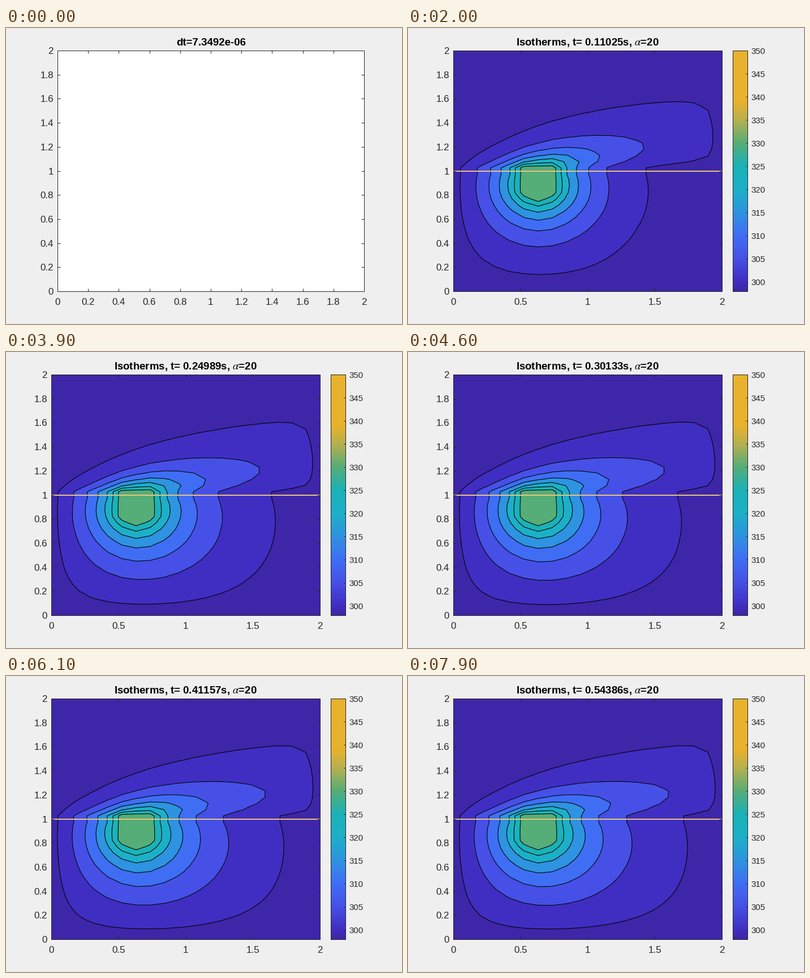
A matplotlib script for the animation above (8000 ms loop, 700 by 525 pixels).

```python
import numpy as np
import matplotlib.pyplot as plt
from matplotlib.animation import FuncAnimation
from matplotlib.colors import LinearSegmentedColormap

plt.rcParams["font.family"] = "Liberation Sans"
plt.rcParams["mathtext.fontset"] = "stix"

W, H, DPI = 700, 525, 100
FRAMES, STEP_MS, BLANK = 80, 100, 5
INK = "#262626"
PX = 72 / DPI

# heat model: block cooled at its surface, stream of speed U above it
NX, NY, HALF = 20, 40, 20
DX, DY = 2 / (NX - 1), 1 / (HALF - 1)
DT = 7.34923e-6
T0, HOT = 298.0, 333.15
DIFF, U = 1.0, 24.0
ALPHA, COND = 20.0, 20.0
SUB = 10


def is_hot(j, i):
    y = min(j, HALF - 1) * DY
    return j <= HALF and np.hypot(i * DX - 0.632, y - 0.9) < 0.15


def build():
    """Matrix that advances the field by 1000 steps, and the starting field."""
    n = NX * NY
    h = 1000 * DT / SUB
    cx, cy = h * DIFF / DX**2, h * DIFF / DY**2
    m, keep, start = np.eye(n), np.ones(n), np.zeros(n)
    for j in range(NY):
        for i in range(NX):
            p = j * NX + i
            if is_hot(j, i):
                start[p] = HOT - T0
            elif i in (0, NX - 1) or j in (0, NY - 1):
                continue
            elif j in (HALF - 1, HALF):
                keep[p] = 0
                m[p, (HALF - 2) * NX + i] = -1 / (1 + ALPHA / COND * DY)
            else:
                cu = h * U / DX if j > HALF else 0
                m[p, p] += 2 * cx + 2 * cy + cu
                m[p, p - 1] -= cx + cu
                m[p, p + 1] -= cx
                m[p, p - NX] -= cy
                m[p, p + NX] -= cy
    return np.linalg.matrix_power(np.linalg.inv(m) * keep, SUB), start


def solve():
    step, field = build()
    out = []
    for _ in range(FRAMES - BLANK):
        out.append(field.reshape(NY, NX) + T0)
        field = step @ field
    return out


FIELDS = solve()
XS, YS = np.linspace(0, 2, NX), np.linspace(0, 2, NY)
LEVELS = np.arange(300, 331, 5)
LOW, HIGH = 298, 350
STOPS = [(298, "#3e26a8"), (300, "#402ec2"), (305, "#4650e6"), (310, "#3f6ef5"),
         (315, "#2e93e0"), (320, "#1cb0c8"), (325, "#1ab2b8"), (330, "#55ad78"),
         (335, "#b5b050"), (339, "#e8b22c"), (350, "#e8b22c")]
CMAP = LinearSegmentedColormap.from_list(
    "heat", [((t - LOW) / (HIGH - LOW), c) for t, c in STOPS], N=256)
BANDS = [c for _, c in STOPS[:8]]

fig = plt.figure(figsize=(W / DPI, H / DPI), dpi=DPI, facecolor="#efefef")


def add_axes(x0, x1, size):
    top, bottom = 40, 467
    ax = fig.add_axes([x0 / W, 1 - bottom / H, (x1 - x0) / W, (bottom - top) / H])
    ax.tick_params(direction="in", length=5 * PX, width=PX, color=INK,
                   labelcolor=INK, labelsize=size * PX, top=True, right=True,
                   pad=7 * PX)
    ax.set_axisbelow(False)
    for s in ax.spines.values():
        s.set(color=INK, linewidth=PX)
    return ax


def plane(x0, x1, xstep):
    ax = add_axes(x0, x1, 17)
    ax.set(xlim=(0, 2), ylim=(0, 2))
    for axis, step in ((ax.xaxis, xstep), (ax.yaxis, 0.2)):
        ticks = np.arange(0, 2.01, step)
        axis.set_ticks(ticks, [f"{t:.3g}" for t in ticks])
    ax.tick_params(axis="x", pad=12 * PX)
    return ax


blank = plane(91, 633, 0.2)
main = plane(80, 555, 0.5)
main.axhline(1, color="#e8c47a", lw=2 * PX, zorder=2.4)

bar = add_axes(574, 600, 15)
bar.imshow(np.linspace(0, 1, 256)[:, None], cmap=CMAP, aspect="auto",
           origin="lower", extent=(0, 1, LOW, HIGH))
bar.set_xticks([])
bar.set_yticks(range(300, 351, 5))
bar.yaxis.tick_right()
bar.tick_params(axis="y", length=3 * PX, pad=6 * PX)


def add_title(x):
    return fig.text(x / W, 1 - 31 / H, "", ha="center", va="baseline",
                    weight="bold", size=18.6 * PX, color="black")


blank_title, main_title = add_title(362.5), add_title(317.5)
blank_title.set_text(f"dt={DT:.4e}")
drawn = []


def clear():
    while drawn:
        drawn.pop().remove()


def draw(i):
    clear()
    empty = i < BLANK
    blank.set_visible(empty)
    blank_title.set_visible(empty)
    for a in (main, bar, main_title):
        a.set_visible(not empty)
    if empty:
        return
    k = i - BLANK
    t = (1000 * k + 2) * DT
    main_title.set_text(rf"Isotherms, t= {t:.5g}s, $\alpha$=20")
    field = FIELDS[k]
    drawn.append(main.contourf(XS, YS, field, [0, *LEVELS, 400], colors=BANDS, zorder=1))
    drawn.append(main.contour(XS, YS, field, LEVELS, colors="black",
                              linewidths=1.1 * PX, zorder=2))


anim = FuncAnimation(fig, draw, frames=FRAMES, init_func=clear,
                     interval=STEP_MS, repeat=True, repeat_delay=0)
plt.show()
```
